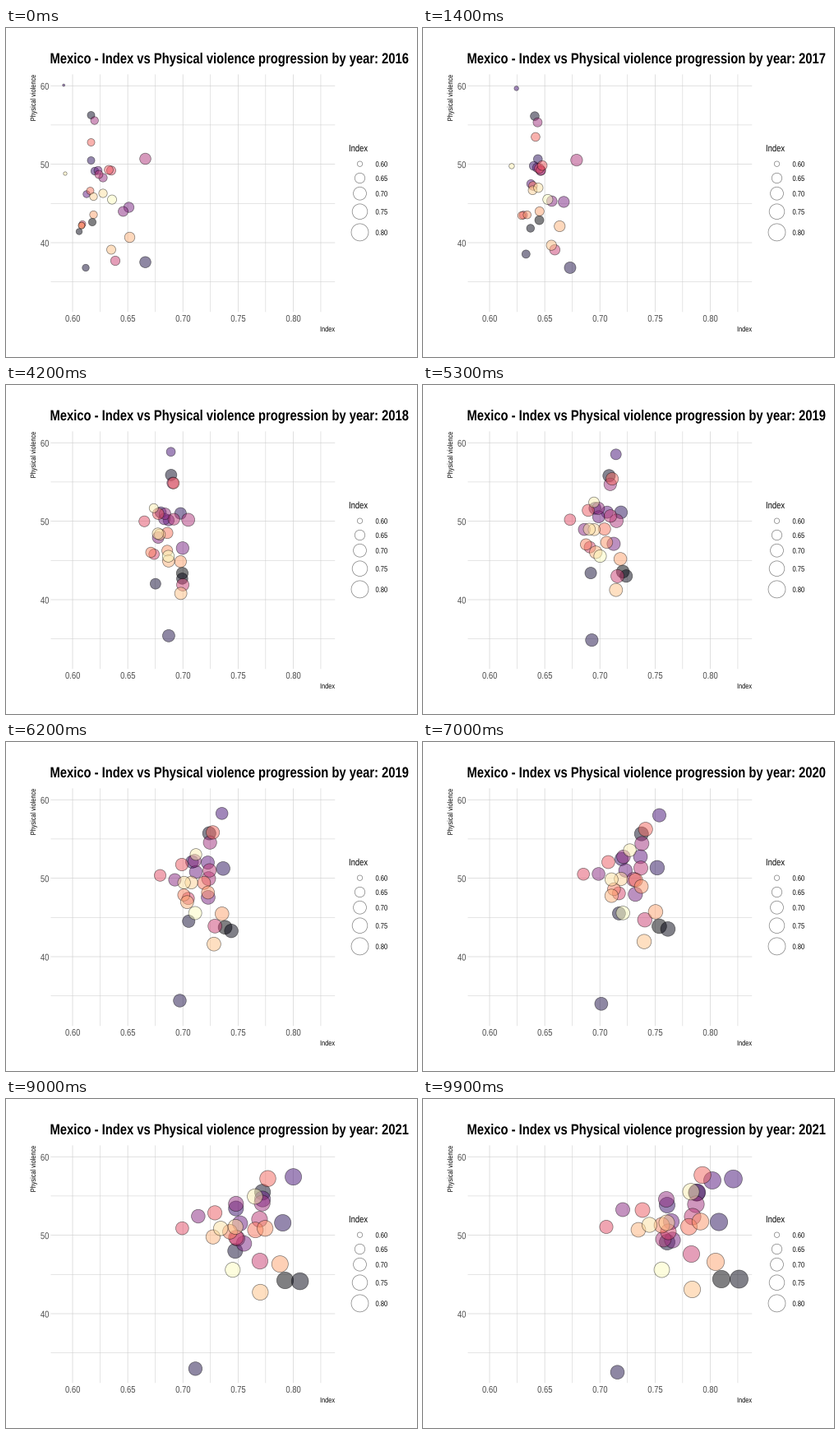
These frames come from a looping animation (500 by 400 pixels, 10000 ms). A matplotlib script:

```python
import matplotlib.pyplot as plt
import numpy as np
from matplotlib.animation import FuncAnimation
from matplotlib.patches import Circle, PathPatch
from matplotlib.textpath import TextPath
from matplotlib.transforms import Affine2D

W, H, DPI = 500, 400, 100
FRAMES, INTERVAL = 100, 100
PX = 72 / DPI          # points per pixel
NARROW = 0.82          # condensed face
X0, X_STEP = 81.0, 67.1
Y0, Y_STEP = 70.2, 95.4
LEFT, RIGHT, TOP, BOTTOM = 54.5, 400.2, 56.4, 345.2

# Pixel positions at the first and last year, dark to light
STATES = [
    (105, 236, 363, 219), (89, 247.5, 384.5, 219),
    (103.5, 106, 333, 114), (97, 291.5, 297, 174),
    (169.5, 284.7, 236.5, 332.2), (103.5, 161, 360, 149.5),
    (108, 174, 297, 129), (70.2, 69.5, 377.5, 97.2),
    (352, 99, 352, 99), (98, 202, 333.5, 113.5),
    (112, 173.2, 302, 149), (149.5, 218, 303.5, 171.5),
    (142.5, 223, 243, 134.5), (118, 182, 296, 122),
    (107.7, 112.5, 332, 128), (169.5, 159, 292.5, 170.5),
    (113, 178, 328, 143), (133, 283, 326.5, 188.5),
    (93, 238.3, 298.5, 161.5), (128, 173.3, 223, 155.5),
    (125, 172.5, 267, 135), (103.5, 139, 340, 92.5),
    (102.5, 198, 323.5, 155.3), (92, 240.3, 290.5, 153.5),
    (92, 240, 337.5, 149), (106.5, 227, 356, 198),
    (150.5, 254.5, 262, 159), (128, 269.5, 327.5, 231.5),
    (106.5, 205, 296.5, 150.5), (118, 201, 275.5, 153),
    (72, 177, 326, 112.7), (129, 208.6, 290.5, 207.6),
]
LATE = 8               # only present in the final year


def radius(x):
    """Area scale: mark size 1 to 10 over the index range."""
    share = np.clip((x - 70.2) / (384.5 - 70.2), 0, 1)
    return 1.42 + 9.6 * np.sqrt(share)


fig = plt.figure(figsize=(W / DPI, H / DPI), dpi=DPI, facecolor="white")
ax = fig.add_axes([0, 0, 1, 1])
ax.set(xlim=(0, W), ylim=(H, 0))
ax.axis("off")


def text_path(s, x, y, size, weight="normal", align=0, angle=0):
    prop = {"family": "Liberation Sans", "weight": weight}
    path = TextPath((0, 0), s, size=size, prop=prop)
    shift = -align * path.get_extents().x1
    place = (Affine2D().translate(shift, 0).scale(NARROW, -1)
             .rotate_deg(angle).translate(x, y))
    return place.transform_path(path)


def label(s, x, y, size, color="black", **kw):
    patch = PathPatch(text_path(s, x, y, size, **kw), fc=color, lw=0, zorder=5)
    return ax.add_patch(patch)


def grid_line(xs, ys, width):
    ax.plot(xs, ys, color="#cccccc", lw=width * PX, zorder=0,
            solid_capstyle="butt", snap=False)


for i in range(10):
    x = X0 + i * X_STEP / 2
    grid_line((x, x), (TOP, BOTTOM), 0.5 if i % 2 else 0.6)
    if i % 2 == 0:
        label(f"{0.6 + i * 0.025:.2f}", x, 357, 11.5, "#4d4d4d", align=0.5)

for i in range(6):
    y = Y0 + i * Y_STEP / 2
    grid_line((LEFT, RIGHT), (y, y), 0.5 if i % 2 else 0.6)
    if i % 2 == 0:
        label(str(60 - 5 * i), 52, y + 4.6, 11.5, "#4d4d4d", align=1)

label("Index", 400, 369, 9, align=1)
label("Physical violence", 36, 57, 9, align=1, angle=-90)

label("Index", 417, 150, 11.5)
for i, y in enumerate((165.2, 182.5, 201.2, 223.2, 248.4)):
    r = radius(X0 + i * X_STEP)
    ax.add_patch(Circle((430.5, y), r, fc="none", ec=(0, 0, 0, 0.5),
                        lw=0.71 * PX))
    label(f"{0.6 + 0.05 * i:.2f}", 449.5, y + 3.4, 9.2)


def title_path(year):
    s = f"Mexico - Index vs Physical violence progression by year: {year}"
    return text_path(s, 53.5, 43, 18, weight="bold")


title = ax.add_patch(PathPatch(title_path(2016), fc="black", lw=0))
magma = plt.get_cmap("magma")
dots = []
for i, (x, y, *_) in enumerate(STATES):
    fill = magma(i / (len(STATES) - 1), alpha=0.5)
    dots.append(ax.add_patch(Circle((x, y), radius(x), fc=fill,
                                    ec=(0, 0, 0, 0.5), lw=0.71 * PX,
                                    zorder=2 + i / 100)))


def draw(frame):
    t = frame / (FRAMES - 1)
    title.set_path(title_path(2016 + int(5 * t + 0.5)))
    for dot, (xa, ya, xb, yb) in zip(dots, STATES):
        dot.center = xa + (xb - xa) * t, ya + (yb - ya) * t
        dot.set_radius(radius(xa) + (radius(xb) - radius(xa)) * t)
    dots[LATE].set_visible(frame == FRAMES - 1)
    return [title, *dots]


anim = FuncAnimation(fig, draw, frames=FRAMES, interval=INTERVAL,
                     init_func=lambda: draw(0), repeat=True, repeat_delay=0)
plt.show()
```
